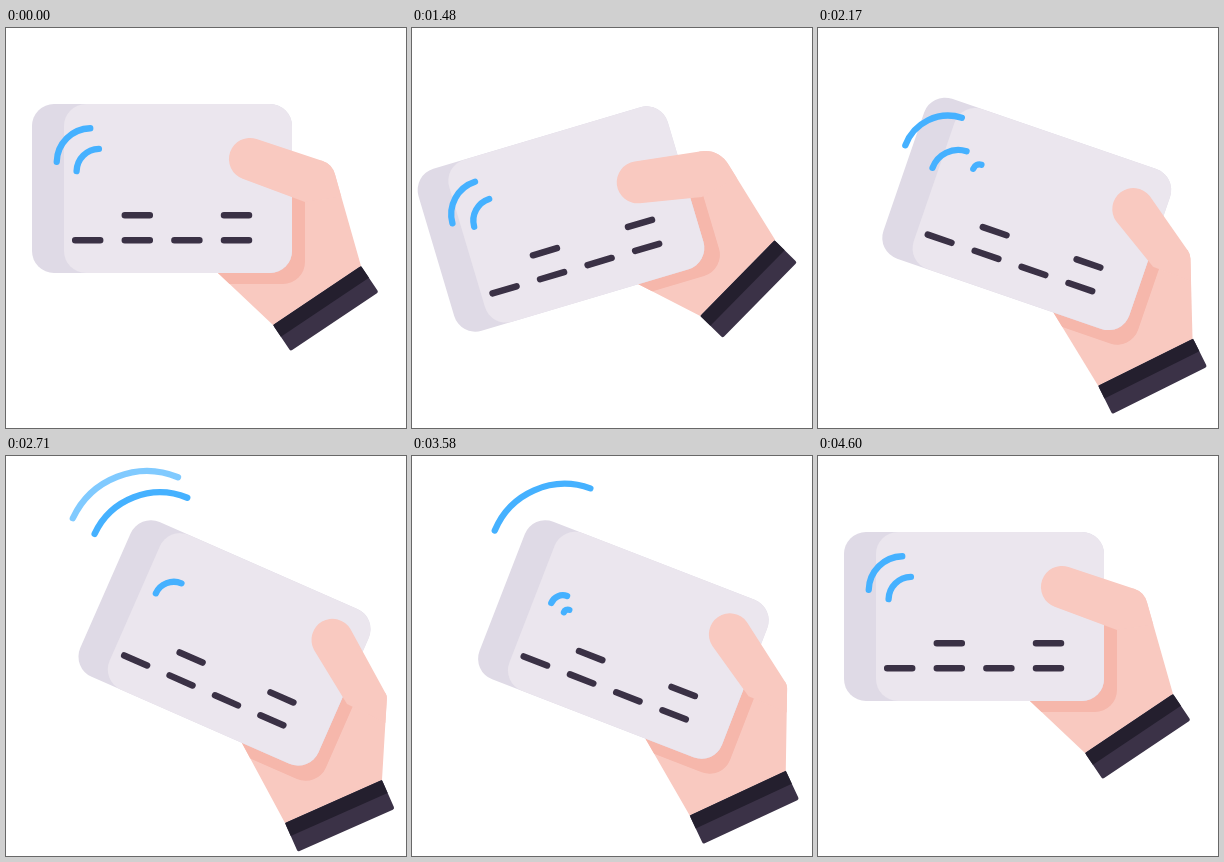
An HTML page that plays this animation: 400x400 px, repeating every 4630 ms.

```html
<!DOCTYPE html>
<html lang="en">
<head>
<meta charset="utf-8">
<title>Contactless card</title>
<style>
  html, body { margin: 0; width: 100%; height: 100%; overflow: hidden; background: #fff; }
  svg { display: block; width: 100vw; height: 100vh; }
</style>
</head>
<body>
<svg viewBox="0 0 400 400">
  <defs><clipPath id="palmClip"><path id="palmEdge"/></clipPath></defs>
  <path id="palm" fill="#f9c9c0"/>
  <g clip-path="url(#palmClip)">
    <rect id="shadow" x="39" y="87" width="260" height="169" rx="22" fill="#f6b7ab"/>
  </g>
  <g id="cuff">
    <rect width="106" height="31.5" rx="2" fill="#3b3247"/>
    <path d="M0 0H106V14.2H0Z" fill="#241f2e"/>
  </g>
  <g id="card">
    <rect x="26" y="76" width="260" height="169" rx="22" fill="#dfdae6"/>
    <rect x="58" y="76" width="228" height="169" rx="22" fill="#ebe6ee"/>
    <path d="M69.2 212.3h25M118.8 212.3h25M168.4 212.3h25M218 212.3h25M118.8 187.3h25M218 187.3h25"
      stroke="#3a3145" stroke-width="6.5" stroke-linecap="round"/>
    <g id="waves" fill="none" stroke="#45b1ff" stroke-width="6.3" stroke-linecap="round"/>
  </g>
  <path id="thumb" fill="#f9c9c0"/>
</svg>
<script>
const LOOP = 4630;
const $ = id => document.getElementById(id);

// card: shift x, shift y, angle; the rest are points of the hand
const rest = {
  card: [0, 0, 0], tip: [244, 131], knuckle: [326, 136], crease: [299, 174],
  cuffL: [267, 297], cuffR: [355, 238], heel: [195.5, 229.4], round: [10.5]
};
const back = {
  card: [4.7, 7.3, -17.1], tip: [225.2, 155], knuckle: [305.9, 120], crease: [289.6, 168.8],
  cuffL: [288.9, 287.6], cuffR: [363.3, 211], heel: [207.9, 247.1], round: [19.4]
};
const raised = {
  card: [35.5, 52, 23.7], tip: [326, 183], knuckle: [381, 240], crease: [341, 248],
  cuffL: [279, 367], cuffR: [376, 324], heel: [223, 263], round: [2.5]
};
const moves = [[1010, 1540, rest, back], [1540, 2350, back, raised], [3384, 4317, raised, rest]];

// wave keys: time, half chord, chord middle x, y (card space)
const waves = [
  { from: 0, keys: [[1860, 23.7, 67.5, 117], [2170, 31.4, 41.2, 113], [2710, 56.4, 7, 67.5], [2848, 58, 2, 62]] },
  { from: 0, keys: [[1995, 15.8, 81.75, 132], [2170, 18.9, 65.4, 134.3], [2710, 49.7, 28.5, 77.8], [3007, 58, 4, 62]] },
  { from: 2110, keys: [[2110, 2, 97, 133], [2170, 4.5, 94, 132], [2710, 13.7, 83, 133], [3200, 46, 28, 76], [3500, 58, 8, 56]] },
  { from: 2800, keys: [[2800, 2, 95, 142], [3000, 13, 84, 133], [3580, 52.2, 33.7, 68.5], [3800, 58, 20, 52]] },
  { from: 3440, keys: [[3440, 1, 90, 154], [3580, 8.6, 81.7, 146.4], [3980, 23.7, 67.5, 117]] },
  { from: 3530, keys: [[3530, 1, 95, 156], [3580, 2.9, 92.8, 154.5], [4030, 15.8, 81.75, 132]] }
];
for (const w of waves) {
  w.el = document.createElementNS('http://www.w3.org/2000/svg', 'path');
  $('waves').append(w.el);
}

const clamp = (v, a = 0, b = 1) => Math.min(b, Math.max(a, v));
const mix = (a, b, k) => a.map((v, i) => v + (b[i] - v) * k);
const ease = u => (1 - Math.cos(Math.PI * clamp(u))) / 2;
const pt = p => p[0].toFixed(2) + ' ' + p[1].toFixed(2);

function poseAt(t) {
  const [t0, t1, a, b] = moves.filter(m => t >= m[0]).pop() || moves[0];
  const k = ease((t - t0) / (t1 - t0)), pose = {};
  for (const name in a) pose[name] = mix(a[name], b[name], k);
  return pose;
}

// smooth curve through the keys, at rest at both ends
function track(keys, t) {
  const last = keys.length - 1;
  if (t <= keys[0][0]) return keys[0].slice(1);
  if (t >= keys[last][0]) return keys[last].slice(1);
  let i = 0;
  while (t >= keys[i + 1][0]) i++;
  const p = keys[i], q = keys[i + 1], span = q[0] - p[0], u = (t - p[0]) / span;
  const slope = (n, c) => n === 0 || n === last ? 0
    : (keys[n + 1][c] - keys[n - 1][c]) / (keys[n + 1][0] - keys[n - 1][0]);
  return [1, 2, 3].map(c => {
    const s = u * u * (3 - 2 * u);
    return p[c] + (q[c] - p[c]) * s
      + span * u * (1 - u) * ((1 - u) * slope(i, c) - u * slope(i + 1, c));
  });
}

// point of the circle where the line from p touches it
function tangent(p, c, r, side) {
  const dx = p[0] - c[0], dy = p[1] - c[1];
  const a = Math.atan2(dy, dx) + side * Math.acos(r / Math.hypot(dx, dy));
  return [c[0] + r * Math.cos(a), c[1] + r * Math.sin(a)];
}

function toward(a, b, d) {
  return mix(a, b, d / Math.hypot(b[0] - a[0], b[1] - a[1]));
}

function drawHand(p) {
  const r = 21, cut = p.round[0];
  const top = tangent(p.knuckle, p.tip, r, -1);
  const low = tangent(p.crease, p.tip, r, 1);
  const bend = `${pt(toward(p.knuckle, top, cut))}Q${pt(p.knuckle)} ${pt(toward(p.knuckle, p.cuffR, cut))}`;
  const palm = `M${pt(p.heel)}L${pt(p.tip)}L${bend}L${pt(p.cuffR)}L${pt(p.cuffL)}Z`;
  $('palm').setAttribute('d', palm);
  $('palmEdge').setAttribute('d', palm);
  $('thumb').setAttribute('d',
    `M${pt(p.crease)}L${pt(low)}A${r} ${r} 0 0 1 ${pt(top)}L${bend}L${pt(mix(p.knuckle, p.cuffR, 0.32))}Z`);
  const tilt = Math.atan2(p.cuffR[1] - p.cuffL[1], p.cuffR[0] - p.cuffL[0]) * 180 / Math.PI;
  $('cuff').setAttribute('transform', `translate(${pt(p.cuffL)}) rotate(${tilt})`);
}

function drawWave(w, t) {
  const [h, x, y] = track(w.keys, t);
  const fade = clamp((58 - h) / 2.3);
  const on = t >= w.from && fade > 0;
  w.el.setAttribute('opacity', on ? fade : 0);
  const d = h * Math.SQRT1_2, r = h * 1.45;
  w.el.setAttribute('d', `M${pt([x - d, y + d])}A${r} ${r} 0 0 1 ${pt([x + d, y - d])}`);
}

function draw(t) {
  const p = poseAt(t), [x, y, a] = p.card;
  const place = `translate(${x} ${y}) rotate(${a} 230.5 212)`;
  $('card').setAttribute('transform', place);
  $('shadow').setAttribute('transform', place);
  drawHand(p);
  for (const w of waves) drawWave(w, t);
}

const start = performance.now();
function tick(now) {
  draw(Math.max(0, now - start) % LOOP);
  requestAnimationFrame(tick);
}
draw(0);
requestAnimationFrame(tick);
</script>
</body>
</html>
```
